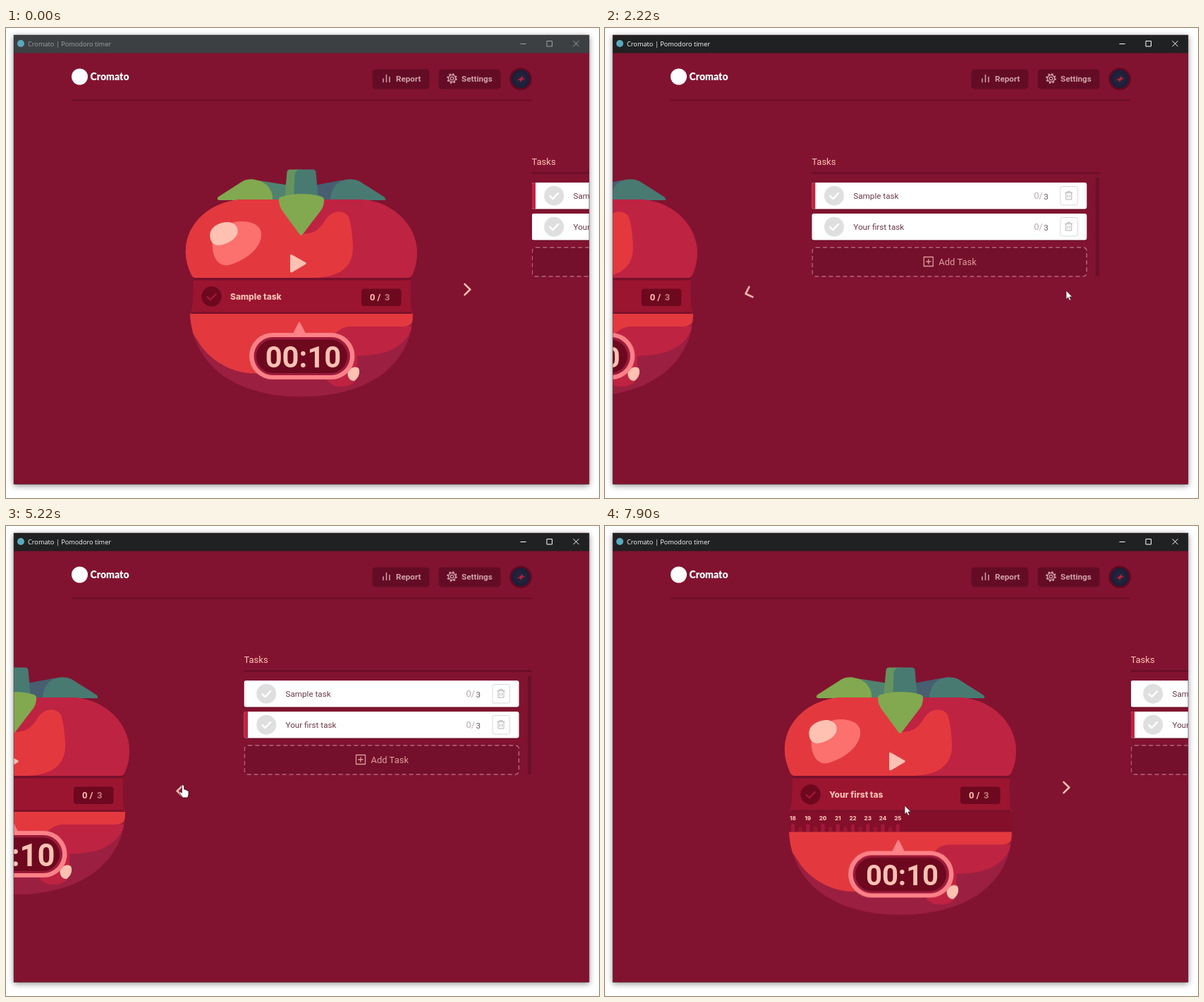
An HTML page for the animation above (8000 ms loop, 841 by 666 pixels).

```html
<!DOCTYPE html>
<html lang="en">
<head>
<meta charset="utf-8">
<title>Pomodoro timer</title>
<style>
html, body { margin: 0; width: 100%; height: 100%; overflow: hidden; background: #fff; }
svg { display: block; width: 841px; height: 666px; font-family: Roboto, sans-serif; }
.frame { filter: drop-shadow(0 2px 4px rgba(0,0,0,.45)); }
.wide { font-family: Inter, sans-serif; font-weight: 800; }
.bold { font-weight: 700; }
.line { fill: none; stroke-linecap: round; stroke-linejoin: round; }
.cream { fill: #ffc1b2; }

.bar, .caption, .slide, .chevron, .pulse, .bowl, .timer, .reveal, .scroll,
.first, .second, .last, .cursor, .arrow, .hand, .beam, .click { animation: 8s linear infinite; }
.bar, .caption, .first, .second, .last, .arrow, .hand, .beam, .click { animation-timing-function: step-end; }

.bar { animation-name: bar; }
.caption { animation-name: caption; }
@keyframes bar { 0% { fill: #3c4043; } 22.5%, 100% { fill: #202122; } }
@keyframes caption { 0% { color: #a0a2a4; } 22.5%, 100% { color: #fff; } }

.slide { animation-name: slide; }
.chevron { animation-name: turn; transform-origin: 654.5px 373px; }
@keyframes slide {
  0%, 24.125% { transform: none; animation-timing-function: cubic-bezier(.4,0,.2,1.6); }
  30.375% { transform: translateX(-408px); }
  67% { transform: translateX(-408px); animation-timing-function: cubic-bezier(.4,0,.2,1.6); }
  73.25%, 100% { transform: none; }
}
@keyframes turn {
  0%, 24.125% { transform: rotate(0deg); animation-timing-function: cubic-bezier(.4,0,.2,1.6); }
  30.375% { transform: rotate(-180deg); }
  67% { transform: rotate(-180deg); animation-timing-function: cubic-bezier(.4,0,.2,1.6); }
  73.25%, 100% { transform: rotate(0deg); }
}

.pulse { animation-name: pulse; animation-timing-function: ease-in-out; transform-origin: 421.5px 466.5px; }
@keyframes pulse {
  0% { transform: scale(1.045); animation-timing-function: ease-out; }
  5.75%, 30.75%, 55.75%, 80.75%, 100% { transform: scale(1); }
  18.25%, 43.25%, 68.25% { transform: scale(1.1); }
}

.bowl { animation-name: drop-bowl; }
.timer { animation-name: drop-timer; }
.reveal { animation-name: reveal; transform-origin: 0 405px; }
@keyframes drop-bowl {
  0%, 80.625% { transform: none; animation-timing-function: cubic-bezier(.4,0,.2,1.6); }
  86.875%, 100% { transform: translateY(28.5px); }
}
@keyframes drop-timer {
  0%, 80.625% { transform: none; animation-timing-function: cubic-bezier(.4,0,.2,1.6); }
  84.5%, 100% { transform: translateY(28.5px); }
}
@keyframes reveal {
  0%, 80.625% { transform: scaleY(0); animation-timing-function: cubic-bezier(.4,0,.2,1.6); }
  86.1%, 100% { transform: scaleY(1); }
}
.scroll { animation-name: scroll; }
@keyframes scroll {
  0%, 85% { transform: none; animation-timing-function: ease-in-out; }
  97.5%, 100% { transform: translateX(-406px); }
}

.first { animation-name: first; }
.second { animation-name: second; }
.last { animation-name: last; }
@keyframes first { 0% { opacity: 1; } 49.5%, 100% { opacity: 0; } }
@keyframes second { 0% { opacity: 0; } 49.5%, 100% { opacity: 1; } }
@keyframes last { 0% { fill-opacity: 1; } 98.1%, 100% { fill-opacity: 0; } }

.cursor { animation-name: move; animation-timing-function: ease-in-out; }
@keyframes move {
  0%, 7.25% { transform: translate(800px,666px); }
  16.9%, 36.9% { transform: translate(654px,372px); }
  39.75% { transform: translate(562px,313px); }
  44.4%, 56.2% { transform: translate(500px,276px); }
  62.5%, 66.6% { transform: translate(251px,367px); }
  67.5%, 77.2% { transform: translate(251px,370px); }
  81.9%, 84% { transform: translate(412px,394px); }
  87.5%, 100% { transform: translate(425px,396px); }
}
.arrow { animation-name: arrow; }
.hand { animation-name: hand; }
.beam { animation-name: beam; }
.click { animation-name: click; }
@keyframes arrow {
  0% { opacity: 0; } 7.25% { opacity: 1; } 16.6% { opacity: 0; }
  25% { opacity: 1; } 39% { opacity: 0; } 59.6% { opacity: 1; } 62% { opacity: 0; }
  67.5% { opacity: 1; } 80.4% { opacity: 0; } 85.6%, 100% { opacity: 1; }
}
@keyframes hand {
  0% { opacity: 0; } 16.6% { opacity: 1; } 25% { opacity: 0; } 39% { opacity: 1; }
  59.6% { opacity: 0; } 62% { opacity: 1; } 67.5%, 100% { opacity: 0; }
}
@keyframes beam { 0% { opacity: 0; } 80.4% { opacity: 1; } 85.6%, 100% { opacity: 0; } }
@keyframes click {
  0% { opacity: 0; } 22.8% { opacity: .85; } 24.5% { opacity: 0; }
  49.2% { opacity: .85; } 50.8% { opacity: 0; } 65.9% { opacity: .85; } 67.5%, 100% { opacity: 0; }
}
</style>
</head>
<body>
<svg viewBox="0 0 841 666">
  <defs>
    <clipPath id="window"><rect x="11" y="10" width="816" height="636"/></clipPath>
    <clipPath id="ruler-clip"><rect class="reveal" x="262" y="405" width="314" height="28"/></clipPath>
    <clipPath id="bowl-clip"><path id="bowl-shape" d="M261 405H577C576 474 518 522.500 419 522.500C320 522.500 264 474 261 405Z"/></clipPath>
    <clipPath id="dome-clip"><path id="dome-shape" d="M269 354Q265 354 263 350C257 337 254 325 255 311C258 275 290 246 334 243H506C552 247 583 282 583 318C583 332 580 342 576 350Q574 354 570 354Z"/></clipPath>
    <radialGradient id="avatar"><stop offset="0" stop-color="#33233c"/><stop offset="1" stop-color="#131f3a"/></radialGradient>
  </defs>

  <rect class="frame" x="11" y="10" width="816" height="636.500" fill="#811330"/>

  <!-- title bar -->
  <rect class="bar" x="11" y="10" width="816" height="25.500"/>
  <circle cx="21" cy="22" r="5" fill="#5aa9bd"/>
  <g class="caption">
    <text x="31" y="26" font-size="9.200" fill="currentColor" style="font-family:'Open Sans',sans-serif">Cromato | Pomodoro timer</text>
    <path d="M729.500 22.500h8M767 18.500h7.500v7.500h-7.500zM804.500 18.200l8 8m0-8l-8 8" fill="none" stroke="currentColor"/>
  </g>

  <!-- header -->
  <circle cx="104.500" cy="69" r="11.500" fill="#fff"/>
  <text x="119.500" y="74" font-size="14" font-weight="900" fill="#fff" style="font-family:Lato,sans-serif">Cromato</text>
  <g fill="#640c25">
    <rect x="519.500" y="58.500" width="81" height="28" rx="5"/>
    <rect x="613.500" y="58.500" width="88" height="28" rx="5"/>
    <rect x="93" y="101.500" width="652.500" height="2" opacity=".75"/>
  </g>
  <g class="bold" font-size="11.700" fill="#d2a2a9">
    <text x="553" y="76">Report</text>
    <text x="646" y="76">Settings</text>
  </g>
  <g class="line" stroke="#d2a2a9" stroke-width="1.500">
    <path d="M535 72v4.500M539.500 66.500v10M544 69.500v7"/>
    <circle cx="632.500" cy="71.500" r="2.200" stroke-width="1.300"/>
    <circle cx="632.500" cy="71.500" r="5" stroke-width="1.300"/>
    <circle cx="632.500" cy="71.500" r="6.400" stroke-width="1.800" stroke-linecap="butt" stroke-dasharray="2.500 2.526"/>
  </g>
  <circle cx="730" cy="72.300" r="14.200" fill="url(#avatar)" stroke="#5d0a22" stroke-width="3"/>
  <path d="M725 74l5-3 2-3 1 3 4 1-5 1-2 4-1-3z" fill="#b8243c"/>

  <g clip-path="url(#window)">
    <g class="slide">
      <!-- tomato, upper half -->
      <path d="M300 243Q299 240 303 238L335 217.500Q342 213.500 351 214.500L362 217Q384 228 380 244H302Z" fill="#82a850"/>
      <path d="M361 216.500L399 222.500V244H378Q379 226 361 216.500Z" fill="#518270"/>
      <path d="M440 222.500L477 215.500V244H440Z" fill="#475f70"/>
      <path d="M460 244Q461 222 479 215.500Q492 212.500 501 217L535 238.500Q539 241 538 244Z" fill="#487a72"/>
      <path d="M395 244L398.500 204Q399 200.500 403 200.500H420V244Z" fill="#65945f"/>
      <path d="M408 244L409.500 209Q410 200.500 418 200.500H435Q439 200.500 439.500 204L443 244Z" fill="#487a72"/>
      <use href="#dome-shape" fill="#bf2342"/>
      <g clip-path="url(#dome-clip)">
        <path d="M250 240H419V292C437 292 444 286 453 272C463 256 481 258 486 268C490 280 492 300 492 313C491 340 472 353 436 354H250Z" fill="#e3393e"/>
      </g>
      <path d="M293 303C303 283 318 274 333 274C351 274 364 281 362 295C360 314 338 330 316 336C300 339 291 322 293 303Z" fill="#fc706d"/>
      <path class="cream" d="M289.500 296C288 284 299 276 313 275C325 275 331 283 328 292C324 301 312 307 301 308C294 308 290 303 289.500 296Z"/>
      <path d="M387 243Q387 240 391 239Q404 235 419 235Q436 235 448 239Q452 241 451 245Q451 252 447 258L421 292Q418.500 295 416 292L391 258Q387 251 387 243Z" fill="#82a850"/>
      <path class="cream" d="M403 323Q403 319.500 406 321.500L424.500 332Q427 333.500 424.500 335L406 346Q403 347.500 403 344Z"/>

      <!-- band -->
      <path d="M266 354H574.500Q573 370 574 385Q574 396 577 405H261.500Q265 396 265 385Q266 370 266 354Z" fill="#9b1530"/>
      <path d="M266 354H574.500V357.500H266ZM264 402.500H575V405H264Z" fill="#78102b"/>
      <circle cx="291.500" cy="380.500" r="14.200" fill="#6d081f"/>
      <path class="line" d="M285.500 381l4.300 4.300 8-8.300" stroke="#a3183a" stroke-width="2.300"/>
      <g class="wide cream" font-size="12">
        <text class="first" x="318" y="385">Sample task</text>
        <text class="second" x="318" y="385">Your first tas<tspan class="last">k</tspan></text>
      </g>
      <rect x="504" y="369.500" width="56.500" height="24.500" rx="4" fill="#6d081f"/>
      <g class="bold cream" font-size="13">
        <text x="516" y="386">0</text><text x="526.500" y="386">/</text>
        <text x="537" y="386" fill="#c57a74" style="fill:#c57a74">3</text>
      </g>

      <!-- tomato, lower half -->
      <g class="bowl">
        <use href="#bowl-shape" fill="#9b1f40"/>
        <g clip-path="url(#bowl-clip)">
          <path d="M440 423H577C566 451 543 464.500 498 464.500V492C498 504 486 508 475 508C463 508 455 502 452 492Z" fill="#bf2342"/>
          <path d="M255 400H578V409Q577 423 564 423H490C475 423 467 431 461 442C452 470 440 489 420 489.500H352C314 489 284 466 270 440L255 420Z" fill="#e3393e"/>
        </g>
        <path class="cream" d="M485 487C488 481 495 479 500 482C503 488 500 496 494 500C488 501 483 494 485 487Z"/>
      </g>
      <g clip-path="url(#ruler-clip)">
        <rect x="262" y="405" width="315" height="28" fill="#830f2a"/>
        <g id="ruler" class="scroll"></g>
      </g>
      <g class="timer">
        <path d="M414.500 418Q416 415 417.500 418L426 435H406Z" fill="#fd8187"/>
        <rect x="345" y="432" width="149.500" height="66" rx="33" fill="#fd8187"/>
        <rect x="351.500" y="438" width="136.500" height="54" rx="27" fill="#9b1a3a"/>
        <rect x="355" y="441.500" width="129" height="47.500" rx="23.700" fill="#6d081f"/>
        <g class="pulse"><text class="bold cream" x="421.500" y="480.800" font-size="40" text-anchor="middle">00:10</text></g>
      </g>
      <path class="line chevron" d="M650.500 362.800L658.300 370.500L650.500 378.200" stroke="#ffc1b2" stroke-width="2.500"/>

      <!-- task list -->
      <g transform="translate(745.500 0)">
        <text class="cream" x="0" y="194" font-size="13">Tasks</text>
        <rect y="204.500" width="408" height="2" fill="#640c25"/>
        <rect x="402.500" y="212" width="5" height="140" fill="#6d0f29"/>
        <g id="rows"></g>
        <rect x=".8" y="311" width="389" height="41" rx="5" fill="#74102b" stroke="#b3667a" stroke-width="1.500" stroke-dasharray="6 4"/>
        <path class="line" d="M159 324.500h13v13h-13zM165.500 327.800v6.400M162.300 331h6.400" stroke="#df9a9c" stroke-width="1.300"/>
        <text x="180" y="335.500" font-size="13" fill="#df9a9c">Add Task</text>
      </g>
    </g>

    <g class="cursor">
      <circle class="click" cx="-1" cy="-1" r="10" fill="#cf8f1a"/>
      <path class="arrow" d="M0 0V12.500L2.800 9.800L4.800 14.200L6.800 13.300L4.900 9H8.700Z" fill="#fff" stroke="#3a1018" stroke-width=".7"/>
      <path class="hand" d="M-1.700 1.500Q-1.700 0 0 0Q1.700 0 1.700 1.500V6.200Q3.600 5.600 4 7Q5.700 6.500 6.200 8Q8 7.600 8 9.500V13Q8 15 6.500 18H-.5Q-2 15 -4.800 11.500Q-5.200 9.300 -3.500 9.600L-1.700 11Z" fill="#fff" stroke="#2a0a12" stroke-width=".8"/>
      <path class="beam" d="M-3 -6.500h2.200L0 -6L.8 -6.500H3M0 -6V6M-3 6.500h2.200L0 6L.8 6.500H3" fill="none" stroke="#9bc4b4"/>
    </g>
  </g>
  <rect x="11" y="10" width="816" height="636.500" fill="none" stroke="#4a2430" stroke-width=".8" opacity=".6"/>
</svg>
<script>
const row = (y, name, mark) => `<g transform="translate(0 ${y})">
  <rect y="1.500" width="390" height="37.500" rx="3" fill="#5a0a20" opacity=".6"/>
  <rect width="390" height="37.500" rx="3" fill="#fff"/>
  <path class="${mark}" d="M5 0H3Q0 0 0 3V34.500Q0 37.500 3 37.500H5Z" fill="#c12341"/>
  <circle cx="31.700" cy="18.700" r="14" fill="#dfdfdf"/>
  <path class="line" d="M26 19.200l4 4 7.600-8" stroke="#fff" stroke-width="2.500"/>
  <text x="59" y="23" font-size="11.700" fill="#6c3a48">${name}</text>
  <text x="315" y="23" font-size="13" fill="#b9aaae">0/</text>
  <text x="329" y="23.500" font-size="11.700" fill="#6b5560">3</text>
  <rect x="352.500" y="5.500" width="24.500" height="26.500" rx="3" fill="#fff" stroke="#d9d9d9"/>
  <path class="line" d="M359.500 14.500h10M362.500 14.500v-2h4v2M360.500 14.500v9.500h8v-9.500M363 17.500v3.700M366 17.500v3.700" stroke="#b5b0b2"/>
</g>`;
document.getElementById('rows').innerHTML =
  row(219, 'Sample task', 'first') + row(263, 'Your first task', 'second');

const step = 21.25, max = 25;
let ruler = '';
for (let i = 0; i <= max; i++) {
  const x = 290 + i * step;
  ruler += `<text class="wide cream" x="${x}" y="416.700" font-size="8" text-anchor="middle">${i}</text>
    <rect x="${x - 2.7}" y="422" width="5.400" height="14" rx="2.700" fill="#a3183a"/>`;
  if (i < max) ruler += `<rect x="${x + step / 2 - 2.7}" y="426" width="5.400" height="10" rx="2.700" fill="#9b1530"/>`;
}
document.getElementById('ruler').innerHTML = ruler;
</script>
</body>
</html>
```
